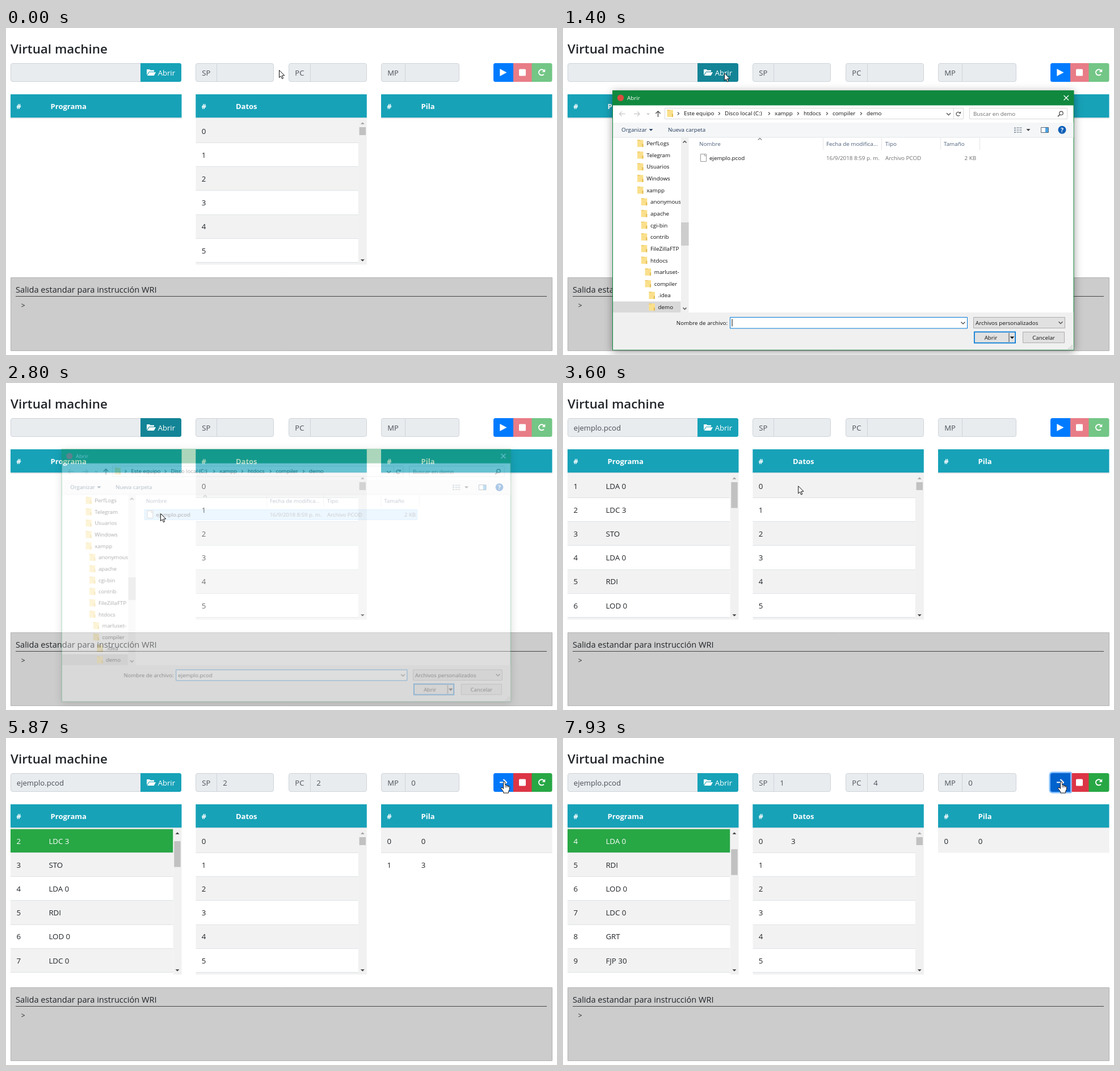
An HTML page with a canvas for the animation above (8 s loop, 971x577 px).

```html
<!DOCTYPE html>
<html lang="es">
<head>
<meta charset="utf-8">
<title>Virtual machine</title>
<style>
html, body { margin: 0; width: 100%; height: 100%; overflow: hidden; background: #fff; }
canvas { display: block; }
</style>
</head>
<body>
<canvas id="stage" width="971" height="577"></canvas>
<script>
const W = 971, H = 577, LOOP = 8000;
const stage = document.getElementById('stage');
const page = stage.getContext('2d');
const layer = document.createElement('canvas');
layer.width = W;
layer.height = H;
const overlay = layer.getContext('2d');
let g = page;

const TEAL = '#17a2b8', GREEN = '#28a745', INK = '#212529', GREY = '#495057';
const ROW = 42.17, PANE_TOP = 160.4, PANE_BOTTOM = 417.5;
const PROGRAM = ['LDA 0', 'LDC 3', 'STO', 'LDA 0', 'RDI', 'LOD 0', 'LDC 0', 'GRT', 'FJP 30', 'LOD 0'];
const STACKS = [[], [0], [0, 3], [], [0]];
const LOADED = 3400;
const PRESSES = [4600, 5400, 6330, 7130, 7870];
const RELEASES = [4930, 5800, 6670, 7470];
const POINTER = [
  [70, 481, 74], [300, 375, 84], [530, 290, 81], [600, 284, 79],
  [1400, 284, 79], [1600, 272, 150], [1800, 264, 213], [1870, 264, 220],
  [1930, 266, 223], [2000, 272, 230], [3400, 272, 230], [3530, 330, 204],
  [3800, 650, 118], [4000, 845, 84], [4200, 878, 77]
];

const clamp = v => Math.max(0, Math.min(1, v));
const ramp = (t, a, b) => clamp((t - a) / (b - a));
const countBefore = (list, t) => list.filter(v => v <= t).length;

function track(keys, t) {
  if (t <= keys[0][0]) return keys[0].slice(1);
  for (let i = 1; i < keys.length; i++) {
    if (t < keys[i][0]) {
      const [a, b] = [keys[i - 1], keys[i]];
      const k = ramp(t, a[0], b[0]);
      return [a[1] + (b[1] - a[1]) * k, a[2] + (b[2] - a[2]) * k];
    }
  }
  return keys[keys.length - 1].slice(1);
}

function mix(a, b, k) {
  return `rgb(${a.map((v, i) => Math.round(v + (b[i] - v) * k)).join()})`;
}

function rect(x, y, w, h, fill) {
  g.fillStyle = fill;
  g.fillRect(x, y, w, h);
}

function frame(x, y, w, h, fill, stroke, radius = 0) {
  g.beginPath();
  g.roundRect(x + .5, y + .5, w - 1, h - 1, radius);
  g.fillStyle = fill;
  g.fill();
  g.lineWidth = 1;
  g.strokeStyle = stroke;
  g.stroke();
}

function rounded(x, y, w, h, radii, fill) {
  g.beginPath();
  g.roundRect(x, y, w, h, radii);
  g.fillStyle = fill;
  g.fill();
}

function text(s, x, y, size, color, weight = 400, align = 'left') {
  g.font = `${weight} ${size}px "Open Sans", "Noto Sans", sans-serif`;
  g.textAlign = align;
  g.fillStyle = color;
  g.fillText(s, x, y);
}

function line(points, color, width = 1) {
  g.beginPath();
  points.forEach(([x, y]) => g.lineTo(x, y));
  g.strokeStyle = color;
  g.lineWidth = width;
  g.stroke();
}

function poly(points, fill) {
  g.beginPath();
  points.forEach(([x, y]) => g.lineTo(x, y));
  g.closePath();
  g.fillStyle = fill;
  g.fill();
}

function circle(x, y, r, fill) {
  g.beginPath();
  g.arc(x, y, r, 0, 7);
  g.fillStyle = fill;
  g.fill();
}

// dir is 1 for pointing down and -1 for pointing up
const triangle = (x, y, r, dir, fill) =>
  poly([[x - r, y - dir * r / 2], [x + r, y - dir * r / 2], [x, y + dir * r / 2]], fill);
const chevron = (x, y, r, dir, color, width = 1.2) =>
  line([[x - r, y - dir * r / 2], [x, y + dir * r / 2], [x + r, y - dir * r / 2]], color, width);

function clipped(x, y, w, h, draw) {
  g.save();
  g.beginPath();
  g.rect(x, y, w, h);
  g.clip();
  draw();
  g.restore();
}

function loopArrow(x, y, r, width, color) {
  g.beginPath();
  g.arc(x, y, r, .7, 5.6);
  g.strokeStyle = color;
  g.lineWidth = width;
  g.stroke();
  poly([[x + r + 1.2, y - r - 1], [x + r + 1.2, y - .6], [x + .6, y - .6]], color);
}

function register(x, w, split, label, value) {
  frame(x, 62, w, 33, '#e9ecef', '#ced4da', 3.5);
  rect(split, 62, 1, 33, '#ced4da');
  text(label, x + 11.3, 83.5, 13, GREY);
  text(value, split + 11.3, 84, 13.2, GREY);
}

function tableHead(x, title) {
  rect(x, 117, 301.5, 41, TEAL);
  rect(x, 158, 301.5, 2, '#dee2e6');
  text('#', x + 10.3, 143, 13, '#fff', 700);
  text(title, x + 70.6, 143, 13, '#fff', 700);
}

function tableRow(x, w, slot, index, value, valueX, striped, active) {
  const top = PANE_TOP + slot * ROW;
  if (striped) rect(x, top, w, ROW, '#f2f2f2');
  if (active) rect(x, top, w, ROW, GREEN);
  if (slot) rect(x, Math.floor(top), w, 1, '#dee2e6');
  const color = active ? '#fff' : INK;
  text(index, x + 10.4, top + 26.4, 13.3, color);
  text(value, x + valueX, top + 26.4, 13.3, color);
}

function scrollPane(x, thumbY, thumbH, scrolled, drawRows) {
  clipped(x, PANE_TOP, 302, PANE_BOTTOM - PANE_TOP, () => {
    drawRows();
    rect(x + 286.5, PANE_TOP, 15, 260, '#f1f1f1');
    rect(x + 288.3, thumbY, 11.4, thumbH, '#c1c1c1');
    triangle(x + 294, 168, 3.5, -1, scrolled ? '#404040' : '#a3a3a3');
    triangle(x + 294, 410, 3.5, 1, '#404040');
  });
}

function folderOpen(x, y) {
  poly([[x, y + 10], [x, y], [x + 5, y], [x + 6.5, y + 1.6], [x + 13, y + 1.6], [x + 13, y + 4],
    [x + 4, y + 4]], '#fff');
  poly([[x + 4.4, y + 5], [x + 16, y + 5], [x + 12.7, y + 11], [x + .8, y + 11]], '#fff');
}

function playButton(t, step) {
  const pressed = countBefore(PRESSES, t);
  const ringed = pressed > step;
  let fill = '#007bff';
  if (ringed) fill = '#0062cc';
  else if (step) fill = mix([0, 123, 255], [0, 105, 217], ramp(t, RELEASES[step - 1] + 60, RELEASES[step - 1] + 130));
  else if (t > 4030) fill = '#0069d9';
  if (ringed) {
    const k = clamp((t - PRESSES[pressed - 1] + 30) / 80);
    rounded(856.5, 59.5, 40, 38, [6, 2, 2, 6], '#fff');
    rounded(856.5, 59.5, 40, 38, [6, 2, 2, 6], `rgba(0,123,255,${.5 * k})`);
  }
  rounded(859, 62, 35, 33, [3.5, 0, 0, 3.5], fill);
  if (step) {
    line([[870, 78.3], [882, 78.3]], '#fff', 2);
    line([[876.5, 73], [882, 78.3], [876.5, 83.6]], '#fff', 2);
  } else {
    poly([[870.3, 72], [882.5, 78.4], [870.3, 85]], '#fff');
  }
}

function drawPage(t) {
  const step = countBefore(RELEASES, t);
  const loaded = t >= LOADED;
  const hover = t >= 530 && t < LOADED + 70;
  const stack = STACKS[step];

  rect(0, 0, W, H, '#fff');
  text('Virtual machine', 8, 44.6, 22.4, INK, 600);

  frame(8, 62, 231, 33, '#e9ecef', '#ced4da', [3.5, 0, 0, 3.5]);
  if (loaded) text('ejemplo.pcod', 18.8, 84, 13.1, GREY);
  rounded(237, 62, 72, 33, [0, 3.5, 3.5, 0], hover ? '#138496' : TEAL);
  folderOpen(248, 73);
  text('Abrir', 267.7, 83.5, 13.1, '#fff');

  register(334, 138, 371, 'SP', step ? stack.length : '');
  register(498, 138, 536, 'PC', step || '');
  register(661, 138, 703, 'MP', step ? 0 : '');

  rounded(893, 62, 34, 33, 0, step ? '#dc3545' : '#e87c87');
  rounded(904, 72.5, 12, 12, 1.5, '#fff');
  rounded(926.5, 62, 36, 33, [0, 3.5, 3.5, 0], step ? GREEN : '#73c686');
  loopArrow(944, 78.3, 5, 2, '#fff');
  playButton(t, step);

  tableHead(8, 'Programa');
  tableHead(334.3, 'Datos');
  tableHead(661, 'Pila');

  if (loaded) {
    const first = Math.max(0, step - 1);
    scrollPane(8, 175 + first * 7.1, 45.5, first > 0, () => {
      PROGRAM.slice(first, first + 7).forEach((op, i) => {
        const n = first + i + 1;
        tableRow(8, 286.5, i, n, op, 67.4, n % 2, n === step);
      });
    });
  }
  scrollPane(334.3, 175, 14, false, () => {
    for (let i = 0; i < 7; i++) {
      tableRow(334.3, 286.5, i, i, i === 0 && step > 2 ? 3 : '', 67.7, i % 2 === 0);
    }
  });
  stack.forEach((v, i) => tableRow(661, 301.5, i, i, v, 70.8, i % 2 === 0));

  frame(8, 440, 955, 130, '#ccc', '#b3b3b3');
  text('Salida estandar para instrucción WRI', 17, 467, 14.6, INK);
  rect(17, 473, 936, 1, '#444');
  text('>', 26.7, 494, 12, INK);
}

const small = (s, x, y, color = '#111', align) => text(s, x, y, 9.8, color, 400, align);

function folder(x, y) {
  rect(x, y, 10.5, 12.5, '#fae08c');
  rect(x, y, 5, 1.2, '#e9c45d');
  rect(x + 8.5, y + 7, 2, 5.5, '#e3b94f');
}

function dialogShell() {
  g.save();
  g.shadowColor = 'rgba(0,0,0,.38)';
  g.shadowBlur = 14;
  g.shadowOffsetY = 3;
  rect(87, 110, 813.5, 458.5, '#10893e');
  g.restore();
  rect(88, 136.5, 811.5, 431, '#fff');
  rect(88, 502, 811.5, 65.5, '#f0f0f0');
  circle(101.5, 123.3, 5.8, '#db4c3f');
  small('Abrir', 113, 127, '#fff');
  line([[882.5, 119], [891, 127.5]], '#fff', 1.2);
  line([[891, 119], [882.5, 127.5]], '#fff', 1.2);
}

function treeScrollbar(y, h) {
  rect(208, 193, 13.5, 309, '#f0f0f0');
  rect(208, y, 13.5, h, '#cdcdcd');
  chevron(214.5, 201, 3, -1, '#505050', 1.5);
  chevron(214.5, 495, 3, 1, '#505050', 1.5);
}

function dialogSkeleton() {
  treeScrollbar(219, 51);
  [[199, 511, 90, 17], [294, 510, 418, 20], [723, 510, 161, 19], [723, 535, 75, 21], [808, 535, 77, 21]]
    .forEach(([x, y, w, h]) => rect(x, y, w, h, '#f8f8ff'));
}

function addressBar() {
  const arrow = (x, dir, color) => {
    line([[x - 5, 151.5], [x + 5, 151.5]], color, 1.3);
    line([[x + dir, 147.5], [x + dir * 5, 151.5], [x + dir, 155.5]], color, 1.3);
  };
  arrow(104.5, -1, '#c8c8c8');
  arrow(130, 1, '#c8c8c8');
  chevron(150, 151.5, 2, 1, '#bbb');
  line([[167.5, 157], [167.5, 147]], '#555', 1.5);
  line([[163.3, 151], [167.5, 146.7], [171.7, 151]], '#555', 1.5);
  frame(179, 141, 527, 20, '#fff', '#d9d9d9');
  folder(183.5, 144.5);
  [['Este equipo', 213], ['Disco local (C:)', 285], ['xampp', 373], ['htdocs', 424],
    ['compiler', 475], ['demo', 535]].forEach(([name, x]) => {
    line([[x - 11, 148.5], [x - 8.5, 151], [x - 11, 153.5]], '#555', 1.2);
    small(name, x, 154);
  });
  chevron(679.5, 152, 3.5, 1, '#444');
  rect(688, 142, 1, 18, '#d9d9d9');
  loopArrow(696.5, 151.7, 3.4, 1.2, '#555');
  frame(716, 141, 173, 20, '#fff', '#d9d9d9');
  small('Buscar en demo', 723, 154.5, '#6d6d6d');
  g.beginPath();
  g.arc(878, 150.3, 3.2, 0, 7);
  g.strokeStyle = '#444';
  g.lineWidth = 1.2;
  g.stroke();
  line([[875.7, 152.6], [872, 156.3]], '#444', 1.5);
}

function toolbar() {
  rect(88, 167, 811.5, 26, '#f5f6f7');
  rect(88, 192.5, 811.5, 1, '#e4e5e7');
  small('Organizar', 103, 183.3, '#1e395b');
  triangle(155, 180, 3.5, 1, '#1e395b');
  small('Nueva carpeta', 185, 183.3, '#1e395b');
  for (let i = 0; i < 3; i++) {
    rect(795, 175.5 + i * 3.8, 3, 2, '#8b98a8');
    rect(799.5, 175.5 + i * 3.8, 4, 1.5, '#8b98a8');
    rect(804.5, 175.5 + i * 3.8, 4, 1.5, '#8b98a8');
  }
  triangle(820, 180, 3.5, 1, '#333');
  frame(842, 175, 14, 10, '#fff', '#567');
  rect(850, 176, 5, 8, '#4ba3e3');
  circle(879.5, 179.8, 7, '#0d5fb8');
  text('?', 879.5, 183.6, 10.5, '#fff', 700, 'center');
}

function tree() {
  const items = [['PerfLogs', 0], ['Telegram', 0], ['Usuarios', 0], ['Windows', 0], ['xampp', 0],
    ['anonymous', 1], ['apache', 1], ['cgi-bin', 1], ['contrib', 1], ['FileZillaFTP', 1], ['htdocs', 1],
    ['marluset-', 2], ['compiler', 2], ['.idea', 3], ['demo', 3]];
  rect(88, 482.5, 119.5, 19.5, '#d9d9d9');
  clipped(88, 193, 119.5, 309, () => items.forEach(([name, depth], i) => {
    const x = 131 + depth * 6.8, y = 203.7 + i * 20.63;
    folder(x, y - 6.3);
    small(name, x + 16.2, y + 3.5);
  }));
  treeScrollbar(343, 41);
}

function fileList(hovered, selected) {
  const head = '#4c607a', muted = '#6d6d6d';
  chevron(347, 196, 3.2, -1, '#777');
  [['Nombre', 240], ['Fecha de modifica...', 464], ['Tipo', 568], ['Tamaño', 671]]
    .forEach(([s, x]) => small(s, x, 208, head));
  [458, 561, 665, 734].forEach(x => rect(x, 194, 1, 21, '#e5e5e5'));
  if (selected) frame(237, 220, 494, 19, '#cce8ff', '#99d1ff');
  else if (hovered) rect(237, 220, 494, 19, '#e5f3ff');
  frame(242, 222, 11, 14, '#fff', '#999');
  line([[249.5, 222.5], [249.5, 225.5], [252.5, 225.5]], '#999');
  small('ejemplo.pcod', 258, 233);
  small('16/9/2018 8:59 p. m.', 464, 233, muted);
  small('Archivo PCOD', 568, 233, muted);
  small('2 KB', 728, 233, muted, 'right');
}

function dialogFooter(selected) {
  small('Nombre de archivo:', 290, 523.7, '#111', 'right');
  frame(294, 510, 419, 20.5, '#fff', '#0078d7');
  if (selected) small('ejemplo.pcod', 298, 524);
  else rect(297.5, 513.5, 1, 13, '#000');
  chevron(705, 520.5, 3.5, 1, '#444');
  frame(723, 510, 162, 20, '#e1e1e1', '#adadad');
  small('Archivos personalizados', 727, 523.7);
  chevron(877, 520, 3.5, 1, '#444');
  rect(724, 535.5, 74, 21, '#0078d7');
  rect(725.7, 537.2, 70.6, 17.6, '#e1e1e1');
  rect(785.5, 538, 1, 16, '#444');
  triangle(791.5, 546.5, 3.8, 1, '#111');
  small('Abrir', 754, 549.5, '#111', 'center');
  frame(810, 536, 74, 20, '#e1e1e1', '#adadad');
  small('Cancelar', 847, 549.5, '#111', 'center');
  for (let i = 0; i < 3; i++) {
    for (let j = 0; j <= i; j++) rect(896 - j * 2.7, 559.5 + i * 2.7, 1.5, 1.5, '#b5b5b5');
  }
}

function drawDialog(t) {
  const opening = ramp(t, 1130, 1370);
  const closing = ramp(t, 2690, 2860);
  const alpha = opening * (1 - closing);
  if (alpha <= 0) return;
  const selected = t >= 2000;
  g = overlay;
  g.clearRect(0, 0, W, H);
  dialogShell();
  if (t < 1330) {
    dialogSkeleton();
  } else {
    addressBar();
    toolbar();
    tree();
    fileList(t >= 1930, selected);
    dialogFooter(selected);
  }
  g = page;
  const scale = 1 - .047 * (1 - opening) - .04 * closing;
  const cx = 493.5, cy = 339;
  g.save();
  g.globalAlpha = alpha;
  g.translate(cx, cy);
  g.scale(scale, scale);
  g.drawImage(layer, -cx, -cy);
  g.restore();
}

function outlined(points) {
  poly(points, '#fff');
  g.closePath();
  g.strokeStyle = '#111';
  g.lineWidth = 1;
  g.lineJoin = 'round';
  g.stroke();
  g.lineJoin = 'miter';
}

function drawPointer(t) {
  const [x, y] = track(POINTER, t);
  g.save();
  g.translate(x, y);
  if (t >= 4030) {
    outlined([[-1.3, .7], [.2, 0], [1.6, .8], [1.8, 6], [4, 6], [4.6, 7], [6.7, 6.8], [7.3, 8],
      [9, 8.2], [9.6, 9.5], [9.5, 13.5], [7.8, 17], [7.6, 20], [-1.2, 20], [-1.5, 17.5],
      [-5.4, 12.5], [-5.5, 10.6], [-3.8, 10.3], [-1.5, 12.4]]);
    [2, 4.7, 7.3].forEach(dx => line([[dx, 7], [dx, 10.3]], '#111', .9));
  } else {
    outlined([[.5, .5], [.5, 13.5], [3.5, 10.8], [5.5, 15.6], [7.6, 14.7], [5.6, 10], [9.8, 9.8]]);
  }
  g.restore();
}

function tick(now) {
  const t = now % LOOP;
  drawPage(t);
  drawDialog(t);
  drawPointer(t);
  requestAnimationFrame(tick);
}
requestAnimationFrame(tick);
</script>
</body>
</html>
```
